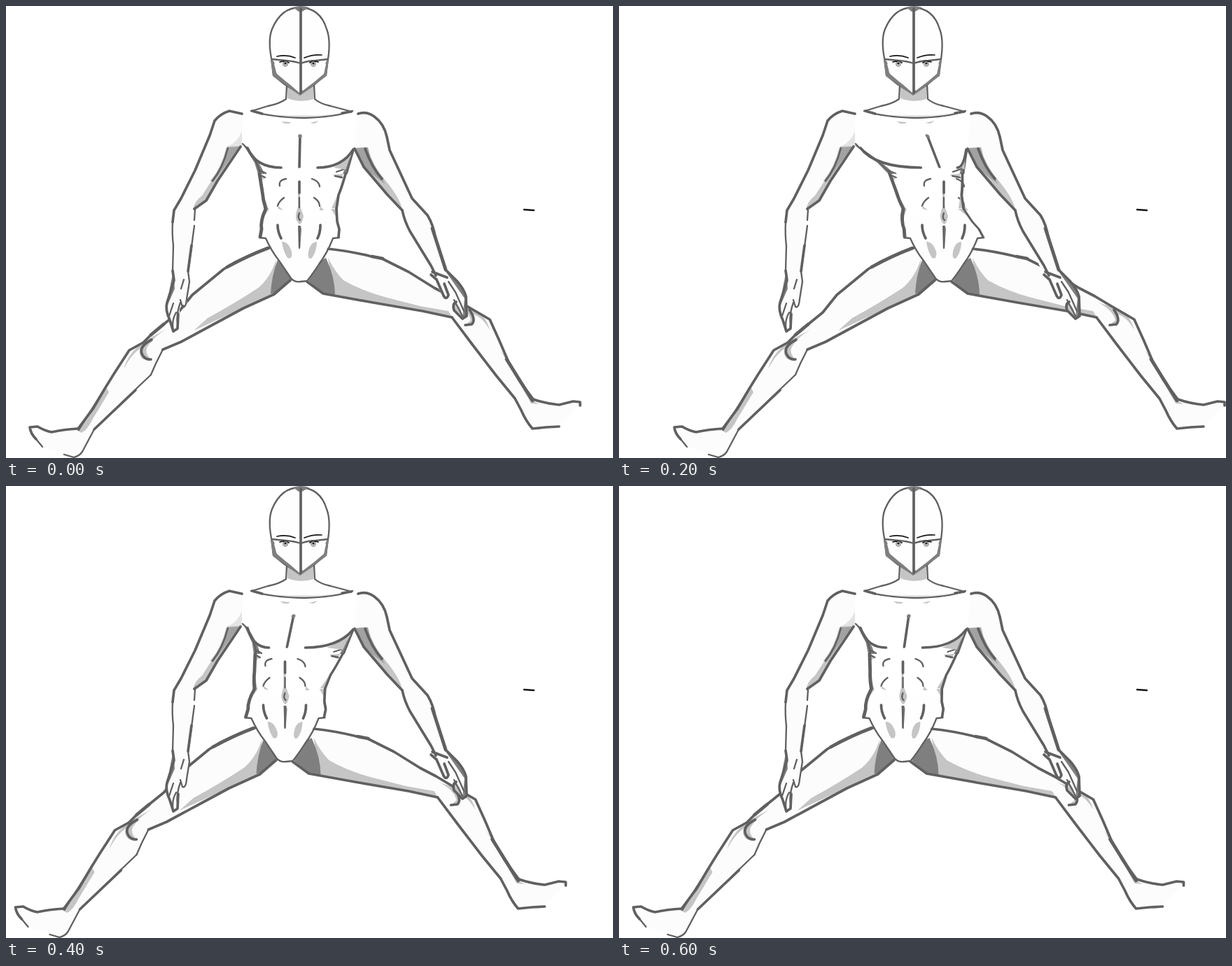
These frames come from a looping animation (867x646 px, 0.7 s). An HTML page without scripts:

```html
<!DOCTYPE html>
<html lang="en">
<head>
<meta charset="utf-8">
<title>Swaying mannequin</title>
<style>
@property --s { syntax: "<number>"; inherits: true; initial-value: 0; }
html, body { margin: 0; width: 100%; height: 100%; overflow: hidden; background: #fff; }
svg {
  display: block; width: 100%; height: 100%;
  /* sway of the hips, and the share of it that reaches ribs and waist */
  --pos: max(var(--s), 0);
  --neg: min(var(--s), 0);
  --la: calc(var(--pos) * .55 + var(--neg) * .3);
  --lb: calc(var(--s) * .78);
  --ra: calc(var(--pos) * .12 + var(--neg) * .2);
  --rb: calc(var(--pos) * .45 + var(--neg) * .8);
  animation: sway 700ms step-end infinite;
}
@keyframes sway {
  0%, 100% { --s: 0; }
  14.2857% { --s: 22.5; }
  28.5714% { --s: 45; }
  42.8571% { --s: 14.5; }
  57.1429% { --s: -20.5; }
  71.4286% { --s: -32.5; }
  85.7143% { --s: -13.5; }
}
.hips { transform: translateX(calc(var(--s) * 1px)); }
/* slanted slab: shift --e at height --y, growing by --k per pixel */
.slab { transform: matrix(1, 0, var(--k), 1, calc(var(--e) - var(--y) * var(--k)), 0); }
.ribL { --k: calc(var(--la) / 37); --e: 0; --y: 203; }
.ribR { --k: calc(var(--ra) / 37); --e: 0; --y: 203; }
.midL { --k: calc((var(--lb) - var(--la)) / 50); --e: var(--la); --y: 240; }
.midR { --k: calc((var(--rb) - var(--ra)) / 50); --e: var(--ra); --y: 240; }
.lowL { --k: calc((var(--s) - var(--lb)) / 40); --e: var(--lb); --y: 290; }
.lowR { --k: calc((var(--s) - var(--rb)) / 40); --e: var(--rb); --y: 290; }
.bone { --k: calc(var(--s) * .0091); --e: calc(var(--s) * .45); --y: 185; }
/* chest curves stretch away from a fixed armpit at --x */
.pec { transform: matrix(var(--w), 0, 0, 1, calc(var(--x) * (1 - var(--w))), 0); }
.pecL { --x: 345; --w: calc(1 + var(--s) * .0177); }
.pecR { --x: 496; --w: calc(1 - var(--s) * .0167); }
.pec path { vector-effect: non-scaling-stroke; }
.neckpit { transform: translateX(calc(var(--s) * .08px)); }
path { fill: none; stroke-linecap: round; stroke-linejoin: round; }
.line path, path.line { stroke: #606060; stroke-width: 3.7; }
.line path.thin, path.line.thin { stroke-width: 2.3; }
.line path.bold, path.line.bold { stroke-width: 4.8; }
path.skin { fill: #fcfcfc; }
path.white { fill: #fefefe; }
.lite { fill: #c5c5c5; }
.pale { fill: #e4e4e4; }
.mid { fill: #a2a2a2; }
.dark { fill: #7f7f7f; }
.ink path { stroke: #151515; stroke-width: 1.7; }
</style>
</head>
<body>
<svg viewBox="0 0 867 646" preserveAspectRatio="none">

<g class="hips">
  <!-- left leg -->
  <path class="skin" d="M378 345L325 368L266 413L225 455L198 478L175 492L140 549L103 605L62 609L34 602L52 630L98 645L108 639L130 600L208 527L224 491L385 411L408 391Z"/>
  <path class="lite" d="M386 362Q378 388 360 403Q325 426 288 446L268 464L383 411Z"/>
  <path class="dark" d="M389 360Q379 386 378 411L386 410L410 391Z"/>
  <path class="lite" d="M201 477L229 462Q211 473 205 483Q196 492 205 503L196 505Q188 498 192 489Q178 499 168 519Q174 495 201 477Z"/>
  <path class="lite" d="M143 544L147 552L124 590Q117 605 108 610L100 606Z"/>
  <g class="line">
    <path d="M378 345Q350 355 326 367L311 376L266 413L246 438L225 455L206 471L196 481L176 492L154 526L141 547L124 576L103 604"/>
    <path class="bold" d="M374 346Q345 357 316 373M225 455L207 470"/>
    <path d="M103 604Q83 605 65 609Q55 607 45 601L34 602Q35 611 43 619"/>
    <path class="thin" d="M43 619L52 630"/>
    <path class="thin" d="M83 641L97 645Q105 643 109 637L126 605L131 600L185 548L207 527"/>
    <path d="M126 605L185 549"/>
    <path class="thin" d="M207 527L214 511L224 491"/>
    <path d="M224 491L250 480L300 453L339 432L383 412L406 392"/>
    <path d="M208 477Q190 486 194 497Q198 506 207 505"/>
    <path class="thin" d="M137 553L104 606"/>
  </g>

  <!-- right leg -->
  <path class="skin" d="M460 347L522 358L612 403L655 427L691 448L715 505L753 563L790 570L821 567L790 601L752 604L735 575L700 525L637 445L453 411L430 393Z"/>
  <path class="lite" d="M460 360Q470 380 482 392Q510 408 545 417L592 429L632 436L637 444L468 413Z"/>
  <path class="dark" d="M444 367L457 360Q470 388 470 413L452 410L432 393Z"/>
  <path class="lite" d="M640 424L665 432Q685 440 691 463Q680 444 668 441Q672 458 655 457L664 449Q660 434 640 424Z"/>
  <path class="lite" d="M706 492Q732 524 749 562L761 569L750 568Q732 536 706 492Z"/>
  <g class="line">
    <path d="M460 347Q490 350 522 358L535 360L575 380L612 403L635 415L655 427L691 448L705 479L717 507L733 535L753 562"/>
    <path class="bold" d="M523 358L538 361"/>
    <path class="bold" d="M715 505L752 564"/>
    <path d="M753 562Q770 568 790 570L810 565L820 566L820 571"/>
    <path d="M790 601L772 602L752 604Q743 594 736 578L727 561L700 528L667 485L637 445"/>
    <path d="M637 445L595 436L525 424L453 411L430 394"/>
    <path d="M662 434Q672 449 665 455L656 456"/>
  </g>
</g>

<!-- pelvis and belly -->
<g class="hips">
  <path class="white" d="M364 331L371 331L388 363L408 391Q420 397 431 391L448 367L467 331L475 331L470 300H372Z"/>
  <path class="line thin" d="M362 331L371 332Q379 350 390 364L407 389Q412 395 420 394L430 393Q438 383 447 369Q459 353 467 332L476 331"/>
  <path class="lite" d="M394 337Q403 336 408 351Q410 363 402 360Q396 351 394 337Z"/>
  <path class="lite" d="M444 337Q435 337 432 351Q430 364 437 360Q444 350 444 337Z"/>
  <path class="lite" d="M417 268H420L420 286L425 300Q423 312 419 312Q413 306 414 298L417 286Z"/>
  <path class="dark" d="M417 314H421L422 319L420 347H418Z"/>
  <g class="line">
    <path d="M419 251V267"/>
    <path class="thin" d="M419 274V288M419 296Q416 303 420 306"/>
    <path class="thin" d="M419 315V345"/>
    <path class="thin" d="M400 247Q389 249 391 257M397 274Q389 280 388 286"/>
    <path class="thin" d="M437 247Q447 250 448 258M440 274Q448 279 448 286"/>
    <path d="M388 313Q388 323 393 332"/>
    <path d="M449 313Q449 324 445 332"/>
  </g>
  <path class="lite" d="M388 285L396 292L389 290ZM449 286L454 292L448 292Z"/>
</g>

<!-- flanks -->
<g class="slab ribL">
  <path class="dark" d="M338 197L346 203L357 218L365 231L369 240H360L355 224Z"/>
  <path class="line thin" d="M343 202Q360 222 363 240M363 235L371 239"/>
</g>
<g class="slab midL">
  <path class="lite" d="M361 240L370 245L365 250ZM368 271L375 290H370Z"/>
  <path class="line bold" d="M362 240L366 265Q367 277 371 290"/>
  <path class="line thin" d="M364 242L370 245"/>
</g>
<g class="slab lowL">
  <path class="lite" d="M370 290H376L369 301Z"/>
  <path class="line bold" d="M371 290Q363 307 365 319L363 330"/>
</g>
<g class="slab ribR">
  <path class="dark" d="M497 204L493 222L488 240H481L487 225Z"/>
  <path class="line thin" d="M497 205L486 240M472 237L484 233"/>
</g>
<g class="slab midR">
  <path class="lite" d="M466 241L478 247L482 240ZM473 271L465 289H472Z"/>
  <path class="line" d="M485 240Q479 261 475 270L472 290"/>
  <path class="line thin" d="M470 243L480 245"/>
</g>
<g class="slab lowR">
  <path class="lite" d="M464 290H472L472 302Z"/>
  <path class="line" d="M472 290L473 308L476 319L475 330"/>
</g>

<!-- chest -->
<g class="pec pecL">
  <path class="line" d="M345 203Q357 231 393 231"/>
</g>
<g class="pec pecR">
  <path class="lite" d="M496 204Q484 222 468 231L485 234L491 216Z"/>
  <path class="line" d="M496 205Q480 231 445 231"/>
</g>
<g class="slab bone">
  <path class="line" d="M420 186L419 230"/>
  <circle class="dark" cx="420" cy="186" r="2.8"/>
</g>
<path class="neckpit lite" d="M393 165L407 166L405 168L398 168ZM434 167L447 164L441 168Z"/>

<!-- left arm -->
<path class="skin" d="M337 153L318 150L298 163L291 185L250 275L240 292L237 320L238 378L241 390L229 433L238 466L246 460L249 424L258 430L262 388L270 290L300 255L337 200Z"/>
<path class="pale" d="M337 179V201L315 201Q330 196 337 179Z"/>
<path class="lite" d="M316 201L336 200L300 255L282 281L267 291Q269 279 280 271L294 249Q308 231 316 201Z"/>
<path class="mid" d="M315 202L333 201L296 252L292 250Q308 231 315 202Z"/>
<path class="dark" d="M239 380L241 404L231 427Q233 402 239 380Z"/>
<g class="line">
  <path d="M337 154L319 150Q306 154 298 164L291 185L270 235L250 275L240 292L238 309"/>
  <path class="thin" d="M238 309Q237 325 239 343L238 379"/>
  <path class="thin" d="M317 203Q310 231 295 250"/>
  <path d="M238 378L240 392L230 424Q227 434 234 449L239 465L245 461L246 440"/>
  <path d="M335 201L302 250L286 278L269 290"/>
  <path class="thin" d="M270 291L269 306M269 314L265 344L260 380"/>
  <path d="M265 342L260 379"/>
  <path class="thin" d="M260 379L262 394L258 419Q257 432 252 430L249 420M249 424Q243 441 245 453M239 425L233 443M243 438Q236 450 239 464M254 391L250 404"/>
  <path class="thin" d="M338 197L343 202"/>
</g>

<!-- right arm -->
<path class="skin" d="M502 153L516 153L538 170L546 200L580 275L602 298L628 376L656 412L659 444L650 447L638 420L626 418L607 384L575 320L566 292L510 230L498 203Z"/>
<path class="lite" d="M498 203L516 202Q525 231 545 253Q562 274 566 290L546 272L512 233Z"/>
<path class="mid" d="M500 203L517 202Q522 227 536 245L542 255L510 230Z"/>
<path class="dark" d="M627 378Q648 390 658 416L659 444L652 447L655 418Z"/>
<path class="lite" d="M640 424Q651 429 651 444Q638 440 640 424Z"/>
<g class="line">
  <path d="M503 154Q515 150 526 158Q540 168 544 187L548 206L580 275L602 299Q610 312 613 330L628 376"/>
  <path class="bold" d="M609 318L628 377"/>
  <path d="M498 204L511 230L545 270L566 292"/>
  <path d="M513 204Q522 230 537 247"/>
  <path d="M566 292Q569 307 577 322L607 371L614 385"/>
  <path d="M607 384L615 391L625 414Q629 421 632 413L626 397M609 380L630 388"/>
  <path d="M628 377L644 393Q654 404 657 415L658 443L652 447L640 435Q637 426 643 423"/>
  <path class="thin" d="M632 394L642 409L654 436M640 420L652 443"/>
</g>

<!-- neck and collar -->
<path class="white" d="M400 112V133L386 141L350 150Q380 159 425 160Q470 159 496 151L455 141L441 133V110Z"/>
<path class="lite" d="M402 116L419 127L439 115V133Q421 139 402 132Z"/>
<path class="pale" d="M362 152L390 156H450L480 153L440 160H400Z"/>
<g class="line">
  <path class="thin" d="M401 114L400 133Q390 140 374 143L351 150"/>
  <path class="thin" d="M440 112L441 133Q449 140 464 143L494 151"/>
  <path class="thin" d="M350 150Q378 159 425 160Q470 159 495 150"/>
  <path d="M352 150L366 154M480 153L493 151"/>
</g>

<!-- head -->
<path class="white line thin" d="M379 75Q374 48 380 33Q393 2 420 2Q449 3 458 33Q464 48 460 76L457 98L441 112L420 126L398 112L382 99Z"/>
<path class="dark" d="M378 74L383 80L386 95L419 124L454 95L457 80L461 74L458 100L440 113L420 128L398 112L381 100Z"/>
<path class="white" d="M383 83Q403 82 418 84V121L400 108L387 97ZM457 83Q437 82 424 84V121L441 108L454 97Z"/>
<path class="dark" d="M410 2Q420 -2 433 2L423 8H418Z"/>
<g class="line">
  <path d="M421 4V124"/>
  <path class="thin" d="M380 76L400 78Q412 79 421 82Q432 78 442 78L460 76"/>
</g>
<g class="ink">
  <path d="M387 72Q401 69 413 74M426 74Q438 69 451 70"/>
  <path d="M391 80Q398 78 404 81M434 81Q439 78 446 80"/>
</g>
<g fill="#c8c8c8" stroke="#8a8a8a">
  <circle cx="399" cy="83" r="3.4"/>
  <circle cx="439" cy="83" r="3.4"/>
</g>
<g fill="#222">
  <circle cx="399" cy="82" r="1.6"/>
  <circle cx="439" cy="82" r="1.6"/>
</g>

<g class="ink"><path style="stroke-width:2.4" d="M740 291L754 292"/></g>
</svg>
</body>
</html>
```
